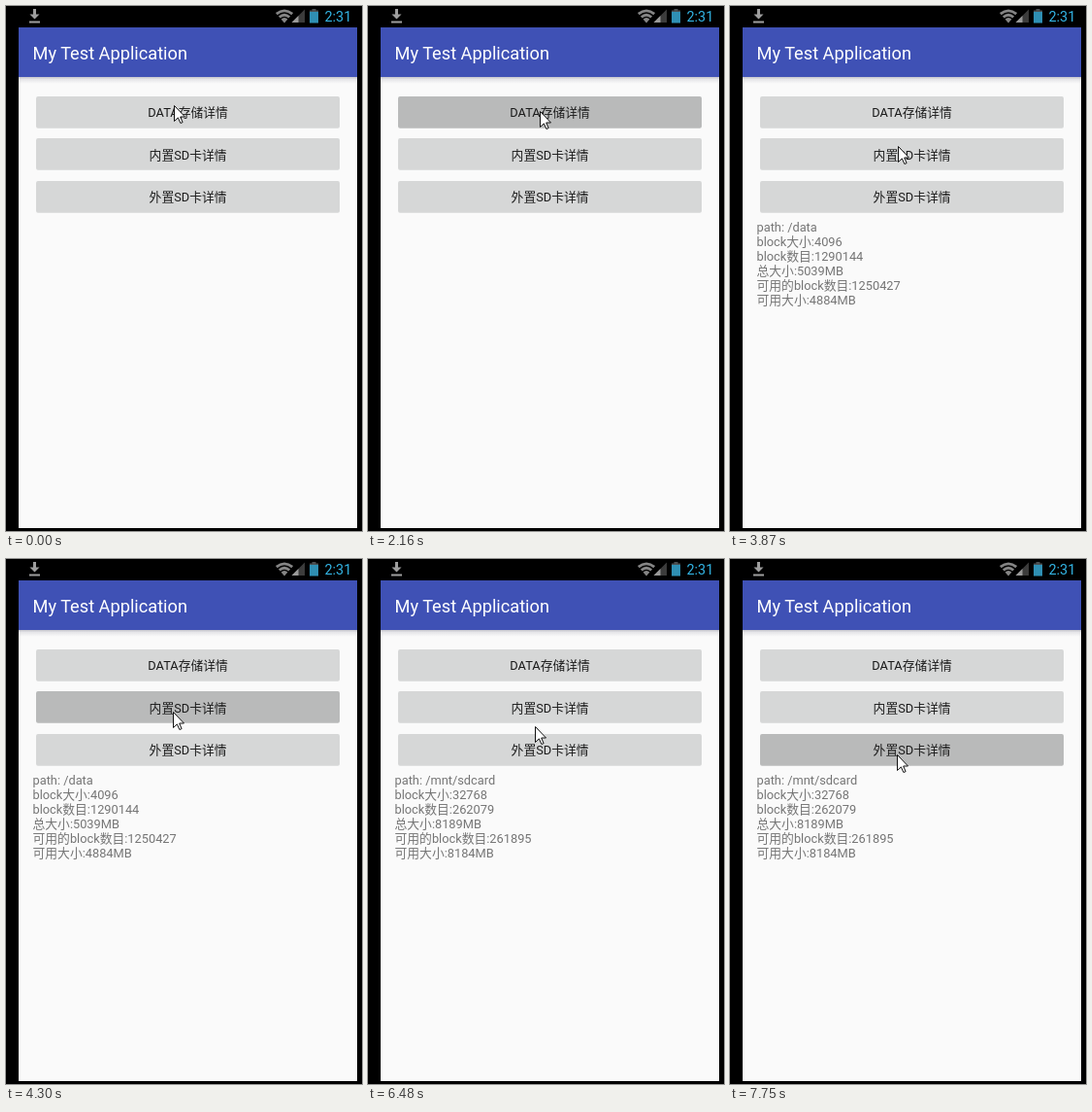
Recreate the animation shown at these times as an HTML page. Size 367 by 540 pixels, loop 8000 ms.

```html
<!DOCTYPE html>
<html lang="zh-CN">
<head>
<meta charset="utf-8">
<title>My Test Application</title>
<style>
  html, body { margin: 0; width: 100%; height: 100%; overflow: hidden; background: #000; }
  svg { display: block; width: 367px; height: 540px; }
  text { font-family: Roboto, "Noto Sans CJK SC", "Noto Sans CJK", sans-serif; font-size: 12.8px; }
  .title { font-size: 18.2px; fill: #fff; }
  .clock { font-size: 14.4px; fill: #33b5e5; }
  .label { fill: #1c1c1c; text-anchor: middle; }
  #info { fill: #757575; }
</style>
</head>
<body>
<svg viewBox="0 0 367 540">
  <defs>
    <linearGradient id="shade" x2="0" y2="1">
      <stop offset="0" stop-color="#c4c4cb"/>
      <stop offset=".35" stop-color="#e6e6e9"/>
      <stop offset="1" stop-color="#fafafa"/>
    </linearGradient>
  </defs>
  <rect width="367" height="540"/>

  <!-- status bar -->
  <path d="M28 3h3v5.500h3.500l-5 5l-5-5h3.500zM24 15.500h11v2h-11z" fill="#9e9e9e"/>
  <g fill="none" stroke="#858585" stroke-width="2.800">
    <path d="M278.800 8.200Q287 1.600 295.200 8.200"/>
    <path d="M281.800 11.500Q287 7 292.200 11.500"/>
  </g>
  <path d="M283.600 13.600Q287 10.600 290.400 13.600L287 17.500z" fill="#858585"/>
  <path d="M308 3.500V17H294.500z" fill="#3c3c3c"/>
  <path d="M301.500 10V17H294.500z" fill="#9a9a9a"/>
  <path d="M315.500 3h4v1.500h2.500v2.500h-9v-2.500h2.500z" fill="#4b4f51"/>
  <rect x="313" y="6" width="9" height="11.500" fill="#2f8fb3"/>
  <text class="clock" x="328.500" y="16">2:31</text>

  <!-- app window -->
  <rect x="13" y="22" width="349" height="515" fill="#fafafa"/>
  <rect x="13" y="73" width="349" height="7" fill="url(#shade)"/>
  <rect x="13" y="22" width="349" height="51" fill="#3f51b5"/>
  <text class="title" x="27.500" y="54.500">My Test Application</text>
  <g id="buttons"></g>
  <g id="info"></g>
  <path id="cursor" d="M.5 .5V16.500L4.400 12.900L6.900 18.500L9.100 17.600L6.700 12H11.500z"
        fill="#fff" stroke="#111" stroke-linejoin="round"/>
</svg>
<script>
const LOOP = 8000;
const $ = id => document.getElementById(id);

// Each glide runs from the previous stop to `to`, in a few visible steps.
const home = [173, 102];
const glides = [
  { from: 440, until: 1010, steps: 5, to: [177, 233], ease: [3, 3.2] },
  { from: 1440, until: 2010, steps: 5, to: [177, 108], ease: [1.05, 2.1] },
  { from: 3870, until: 4140, steps: 3, to: [172, 157], ease: [1, 3.3] },
  { from: 6480, until: 6900, steps: 4, to: [172, 201], ease: [1.2, 2] }
];

const buttons = [
  { label: 'DATA存储详情', press: 2160, release: 2470,
    disk: { path: '/data', size: 4096, count: 1290144, free: 1250427 } },
  { label: '内置SD卡详情', press: 4300, release: 4450,
    disk: { path: '/mnt/sdcard', size: 32768, count: 262079, free: 261895 } },
  { label: '外置SD卡详情', press: 7750, release: LOOP }
];

function add(parent, tag, attrs, text = '') {
  const el = document.createElementNS('http://www.w3.org/2000/svg', tag);
  for (const k in attrs) el.setAttribute(k, attrs[k]);
  el.textContent = text;
  return parent.appendChild(el);
}

buttons.forEach((b, i) => {
  const y = Math.floor(93 + i * 43.5);
  b.rect = add($('buttons'), 'rect', { x: 31, y, width: 313, height: 32.7, rx: 2 });
  add($('buttons'), 'text', { class: 'label', x: 187.6, y: Math.round(114.2 + i * 43.6) }, b.label);
});
const lines = Array.from({ length: 6 }, (_, i) =>
  add($('info'), 'text', { x: 27.5, y: 232 + i * 15 }));

function report({ path, size, count, free }) {
  const mb = blocks => Math.floor(blocks * size / 2 ** 20) + 'MB';
  return [
    `path: ${path}`, `block大小:${size}`, `block数目:${count}`,
    `总大小:${mb(count)}`, `可用的block数目:${free}`, `可用大小:${mb(free)}`
  ];
}

// Slow start grows with a, slow end with b.
const ease = (u, [a, b]) => 1 - (1 - u ** a) ** b;

function cursorAt(t) {
  let pos = home;
  for (const g of glides) {
    if (t < g.from) break;
    const gap = (g.until - g.from) / (g.steps - 1);
    const step = Math.min(g.steps, 1 + Math.floor((t - g.from) / gap));
    const k = ease(step / g.steps, g.ease);
    pos = pos.map((p, i) => Math.floor(p + (g.to[i] - p) * k));
  }
  return pos;
}

function draw(t) {
  const [x, y] = cursorAt(t);
  $('cursor').setAttribute('transform', `translate(${x} ${y})`);
  for (const b of buttons) {
    const down = t >= b.press && t < b.release;
    b.rect.setAttribute('fill', down ? '#b9baba' : '#d6d7d7');
  }
  const shown = buttons.findLast(b => t >= b.release);
  const rows = shown ? report(shown.disk) : [];
  lines.forEach((el, i) => { el.textContent = rows[i] || ''; });
}

let start;
function tick(now) {
  start ??= now;
  draw((now - start) % LOOP);
  requestAnimationFrame(tick);
}
draw(0);
requestAnimationFrame(tick);
</script>
</body>
</html>
```
